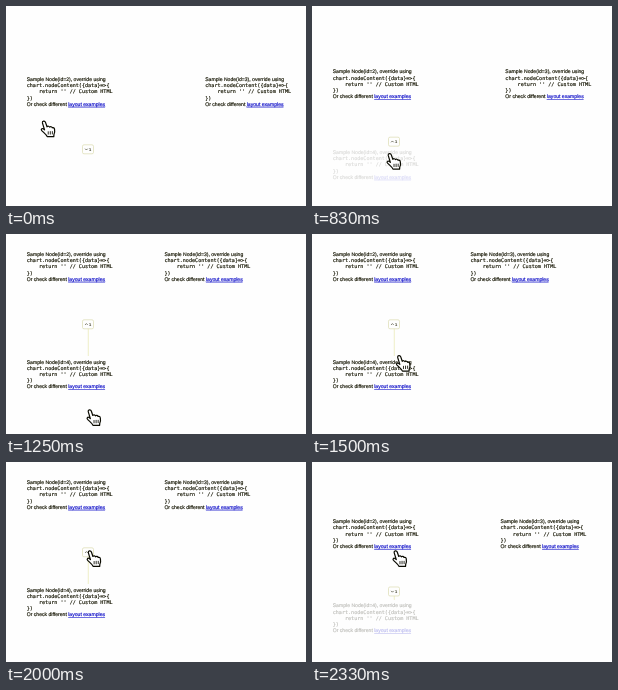
An HTML page for the animation above (2.41 s loop, 300 by 200 pixels).

```html
<!DOCTYPE html>
<html lang="en">
<head>
<meta charset="utf-8">
<title>Org chart expand and collapse</title>
<style>
  html, body { margin: 0; width: 100%; height: 100%; overflow: hidden; background: #fefefe; }
  svg { display: block; width: 300px; height: 200px; }
  text { font: 5.1px "Liberation Sans", Arial, sans-serif; fill: #141400; stroke: #141400; stroke-width: .16; white-space: pre; text-rendering: geometricPrecision; }
  .code { font-family: "DejaVu Sans Mono", "Liberation Mono", monospace; }
  .link { fill: #1010c8; stroke: #1010c8; text-decoration: underline; }
  .edge { stroke: #e8e8b0; stroke-width: .7; }
  .box { fill: #fefefe; stroke: #dcdcb0; stroke-width: .7; }
  .count { font-size: 4px; fill: #444430; stroke: #444430; }
  .chevron { fill: none; stroke: #444430; stroke-width: .7; }
  .hand { fill: #fefefe; stroke: #0a0a00; stroke-width: 1.3; stroke-linejoin: round; }
  .knuckles { fill: none; stroke: #0a0a00; stroke-width: .9; }
</style>
</head>
<body>
<svg viewBox="0 0 300 200">
  <line id="edge" class="edge" x1="82.3" x2="82.3"/>
  <g id="left"></g>
  <g id="right"></g>
  <g id="child"></g>
  <g id="button">
    <rect class="box" x="-5.5" y="-4.5" width="11" height="9" rx="1.5"/>
    <path id="chevron" class="chevron" d="M-2.9 -.6 l1.3 1.3 l1.3 -1.3"/>
    <text class="count" x="1.1" y="1.5">1</text>
  </g>
  <g id="cursor">
    <g transform="translate(-.5 .4) scale(.94)">
      <path class="hand" d="M-1.7 1.6 C-2 -.5 .9 -.9 1.6 1 L3.2 5.7 C4 4.8 5.6 5 6 6.1 C7 5.3 8.4 5.6 8.8 6.8 C10 6.3 11 7 11.2 8.3 C11.6 10.5 11.5 12.5 10.6 14 L10.4 16.2 H3.4 C2.6 14 0 12.2 -2.4 9.8 C-3.6 8.4 -2.2 7 -.8 7.9 L.6 9 Z"/>
      <path class="knuckles" d="M4.5 10.6 v3.4 M6.7 10.4 v3.6 M8.9 10.4 v3.4"/>
    </g>
  </g>
</svg>
<script>
  const LOOP = 2410, MOVE = 400, OPEN_AT = 698, CLOSE_AT = 2091;
  const NODE_HEIGHT = 76, BUTTON_DROP = 70.3, TOP_PAD = 5.5;
  const $ = id => document.getElementById(id);

  // Pointer stops: time, x, y of the fingertip
  const path = [
    [0, 38.5, 115], [170, 48, 146], [330, 64, 163], [500, 76.7, 146.5],
    [670, 78.2, 147.5], [830, 78.3, 147.5], [920, 79, 152], [1080, 83, 183],
    [1170, 84, 184], [1250, 84.3, 175.7], [1420, 86.5, 143], [1580, 89, 100],
    [1750, 89.4, 83.7], [1830, 88.5, 84.5], [2000, 84.4, 88.7], [2410, 84.2, 88.7]
  ];

  function fillNode(id, number) {
    const row = (i, cls, s) => `<text class="${cls}" y="${2 + i * 6.2}">${s}</text>`;
    $(id).innerHTML =
      row(0, "", `Sample Node(id=${number}), override using`) +
      row(1, "code", "chart.nodeContent({data}=&gt;{") +
      row(2, "code", "    return '' // Custom HTML") +
      row(3, "code", "})") +
      row(4, "", 'Or check different <tspan class="link">layout examples</tspan>');
  }
  fillNode("left", 2);
  fillNode("right", 3);
  fillNode("child", 4);

  const mix = (a, b, p) => a + (b - a) * p;
  const place = (id, x, y) => $(id).setAttribute("transform", `translate(${x} ${y})`);

  function easeCubic(p) {
    p = Math.min(1, Math.max(0, p));
    return p < .5 ? 4 * p ** 3 : 1 - 4 * (1 - p) ** 3;
  }

  // Twelve pictures a second, on a 10 ms clock
  function snap(t) {
    const tick = i => Math.round(i * 25 / 3) * 10;
    let i = Math.floor(t * 12 / 1000) + 1;
    while (tick(i) > t) i--;
    return tick(i);
  }

  function pointer(t) {
    const i = path.findIndex(p => p[0] > t);
    const [a, b] = [path[i - 1], path[i]];
    const p = (t - a[0]) / (b[0] - a[0]);
    return [mix(a[1], b[1], p), mix(a[2], b[2], p)];
  }

  function draw(t) {
    const open = easeCubic((t - OPEN_AT) / MOVE) - easeCubic((t - CLOSE_AT) / MOVE);
    const y = mix(73, 20, open);
    const childY = mix(73 + NODE_HEIGHT, 127.5, open);
    const expanded = t >= OPEN_AT && t < CLOSE_AT;

    place("left", 20.7, y);
    place("right", mix(199.2, 158.4, open), y);
    place("child", 20.7, childY);
    $("child").setAttribute("opacity", open);

    place("button", 82, y + BUTTON_DROP);
    $("chevron").setAttribute("transform", expanded ? "scale(1 -1)" : "");

    $("edge").setAttribute("y1", y + BUTTON_DROP);
    $("edge").setAttribute("y2", childY - TOP_PAD);
    $("edge").setAttribute("opacity", open > 0 ? 1 : 0);

    place("cursor", ...pointer(t));
  }

  const start = performance.now();
  function loop() {
    draw(snap((performance.now() - start) % LOOP));
    requestAnimationFrame(loop);
  }
  loop();
</script>
</body>
</html>
```
